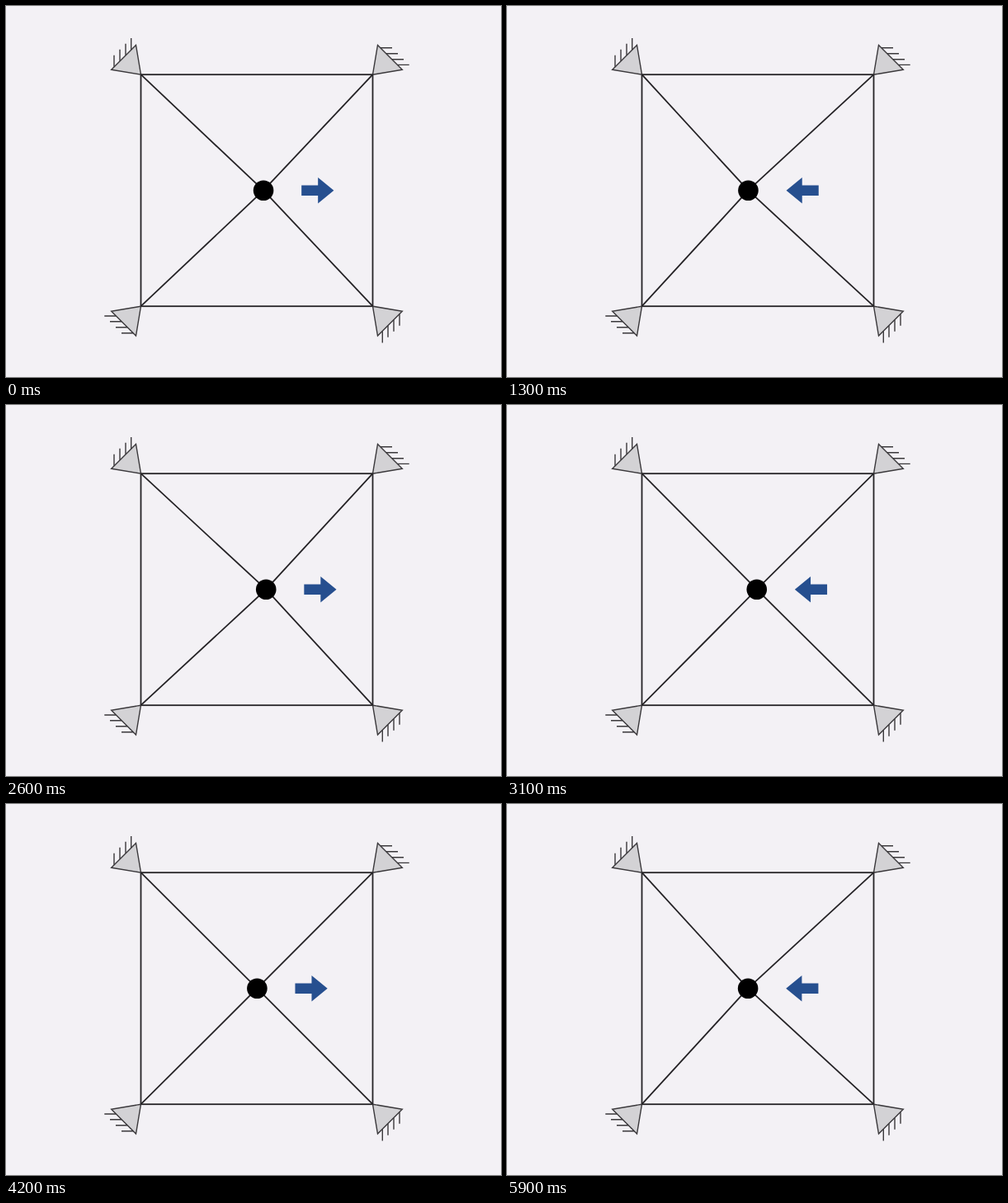
An HTML page for the animation above (6 s loop, 600 by 450 pixels).

```html
<!DOCTYPE html>
<html lang="en">
<head>
<meta charset="utf-8">
<title>Mass on four springs</title>
<style>
  html, body { margin: 0; width: 100%; height: 100%; overflow: hidden; background: #f3f1f5; }
  svg { display: block; width: 600px; height: 450px; }
</style>
</head>
<body>
<svg viewBox="0 0 600 450">
  <defs>
    <g id="support" stroke="#3a383b" stroke-width="1.4">
      <path d="M-140.5-140.5L-146.5-176.3L-176.3-146.5Z" fill="#d3d2d5"/>
      <path d="M-173-150v-14M-166-157v-14M-159-164v-14M-152.3-170.7v-14"/>
    </g>
  </defs>
  <g transform="translate(304 223.7)">
    <rect x="-140.5" y="-140.5" width="281" height="281" fill="none" stroke="#252326" stroke-width="1.8"/>
    <use href="#support"/>
    <use href="#support" transform="rotate(90)"/>
    <use href="#support" transform="rotate(180)"/>
    <use href="#support" transform="rotate(270)"/>
    <path id="cables" stroke="#252326" stroke-width="1.8"/>
    <circle id="mass" r="12.3"/>
    <path id="arrow" d="M-19.6-6.2H.4V-15.8L19.6 0L.4 15.8V6.2H-19.6Z" fill="#264f8f"/>
  </g>
</svg>
<script>
  const LOOP = 6000, STEP = 100, EARLY = 20;
  const CENTER = -0.2, AMPLITUDE = 11.8, PHASE = 44.5, DEGREES_PER_STEP = 16.15;
  const [cables, mass, arrow] = ['cables', 'mass', 'arrow'].map(id => document.getElementById(id));
  const corners = [[-140.5, -140.5], [140.5, -140.5], [140.5, 140.5], [-140.5, 140.5]];

  function draw(now) {
    const step = Math.floor(((now + EARLY) % LOOP) / STEP);
    const shift = AMPLITUDE * Math.sin((PHASE + DEGREES_PER_STEP * step) * Math.PI / 180);
    const x = CENTER + shift;
    cables.setAttribute('d', corners.map(([cx, cy]) => `M${cx} ${cy}L${x} 0`).join(''));
    mass.setAttribute('cx', x);
    arrow.setAttribute('transform', `translate(${x + 65.7} 0) scale(${shift < 0 ? -1 : 1} 1)`);
    requestAnimationFrame(draw);
  }
  draw(0);
</script>
</body>
</html>
```
